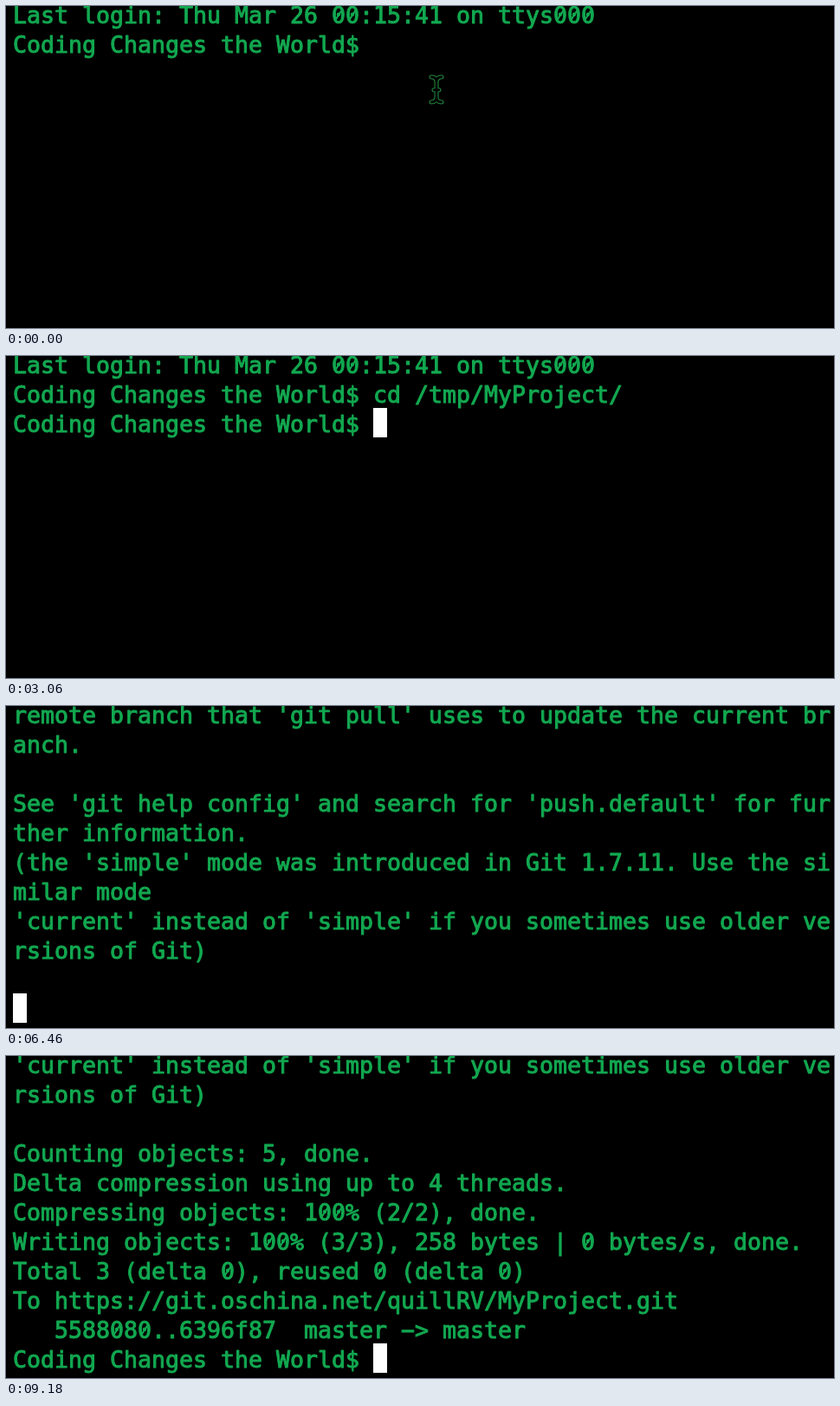
Write an HTML page with a canvas that moves like this. It is 956 px wide and 372 px high and loops after 9350 ms.

```html
<!DOCTYPE html>
<html lang="en">
<head>
<meta charset="utf-8">
<title>Terminal session</title>
<style>
html, body { margin: 0; width: 100%; height: 100%; overflow: hidden; background: #000; }
canvas { display: block; }
</style>
</head>
<body>
<canvas id="stage" width="956" height="372"></canvas>
<script>
const ctx = document.getElementById('stage').getContext('2d');
const LOOP = 9350, TICK = 170;
const LEFT = 8, CELL = 16, ROW = 34, BASELINE = 20, COLUMNS = 59;
const GREEN = '#12a850';

const PROMPT = 'Coding Changes the World$ ';
const LOGIN = 'Last login: Thu Mar 26 00:15:41 on ttys000';
const CD = 'cd /tmp/MyProject/';
const PUSH = 'gpush';

const wrap = line => line.match(new RegExp(`.{1,${COLUMNS}}`, 'g')) || [''];

const ADVICE = [
  "remote branch that 'git pull' uses to update the current branch.",
  '',
  "See 'git help config' and search for 'push.default' for further information.",
  "(the 'simple' mode was introduced in Git 1.7.11. Use the similar mode",
  "'current' instead of 'simple' if you sometimes use older versions of Git)",
  ''
].flatMap(wrap);

const PROGRESS = [
  'Counting objects: 5, done.',
  'Delta compression using up to 4 threads.',
  'Compressing objects: 100% (2/2), done.',
  'Writing objects: 100% (3/3), 258 bytes | 0 bytes/s, done.',
  'Total 3 (delta 0), reused 0 (delta 0)'
];

const RESULT = [
  'To https://git.oschina.net/quillRV/MyProject.git',
  '   5588080..6396f87  master \u2212> master'
];

// The last line always holds the cursor.
function screenAt(t) {
  const tick = Math.floor(t / TICK);
  const typed = (text, start, rate) =>
    PROMPT + text.slice(0, Math.max(0, (tick - start) * rate));

  if (t < 2890) return [LOGIN, typed(CD, 1, 2)];
  if (t < 5100) return [LOGIN, PROMPT + CD, typed(PUSH, 22, 1)];
  if (t < 5950) return [LOGIN, PROMPT + CD, PROMPT + PUSH, 'Please input commit message:', ''];
  if (t < 6800) return [...ADVICE, ''];
  if (t < 8670) return [...ADVICE, ...PROGRESS, ''];
  return [...ADVICE, ...PROGRESS, ...RESULT, PROMPT];
}

function drawZeroSlash(x, baseline) {
  ctx.beginPath();
  ctx.moveTo(x + 4, baseline - 3.5);
  ctx.lineTo(x + 12, baseline - 15.5);
  ctx.lineWidth = 2.2;
  ctx.stroke();
}

// A thin outline gives the text its medium weight.
function drawLine(text, row) {
  const baseline = BASELINE + row * ROW;
  [...text].forEach((char, column) => {
    const x = LEFT + column * CELL;
    ctx.fillText(char, x, baseline);
    ctx.lineWidth = 1;
    ctx.strokeText(char, x, baseline);
    if (char === '0') drawZeroSlash(x, baseline);
  });
}

function drawPointer() {
  const beam = new Path2D();
  for (const side of [-1, 1]) {
    const x = 497 + side * 6;
    beam.moveTo(x, 82);
    beam.quadraticCurveTo(497, 82, 497, 88);
    beam.lineTo(497, 105);
    beam.quadraticCurveTo(497, 111, x, 111);
  }
  beam.moveTo(494, 97);
  beam.lineTo(500, 97);
  ctx.save();
  ctx.lineCap = 'round';
  ctx.strokeStyle = '#20843c';
  ctx.lineWidth = 5;
  ctx.stroke(beam);
  ctx.strokeStyle = '#000';
  ctx.lineWidth = 2.8;
  ctx.stroke(beam);
  ctx.restore();
}

function draw(t) {
  ctx.fillStyle = '#000';
  ctx.fillRect(0, 0, 956, 372);
  ctx.font = '26.577px "DejaVu Sans Mono", monospace';
  ctx.lineJoin = 'round';
  ctx.fillStyle = ctx.strokeStyle = GREEN;

  const lines = screenAt(t).slice(-11);
  lines.forEach(drawLine);

  if (t < 2 * TICK) drawPointer();
  const cursorHidden = t < TICK || (t >= 7820 && t < 8330);
  if (!cursorHidden) {
    const row = lines.length - 1;
    ctx.fillStyle = '#fff';
    ctx.fillRect(LEFT + lines[row].length * CELL, row * ROW - 8, CELL, ROW);
  }
}

const start = performance.now();
function animate() {
  draw((performance.now() - start) % LOOP);
  requestAnimationFrame(animate);
}
animate();
</script>
</body>
</html>
```
